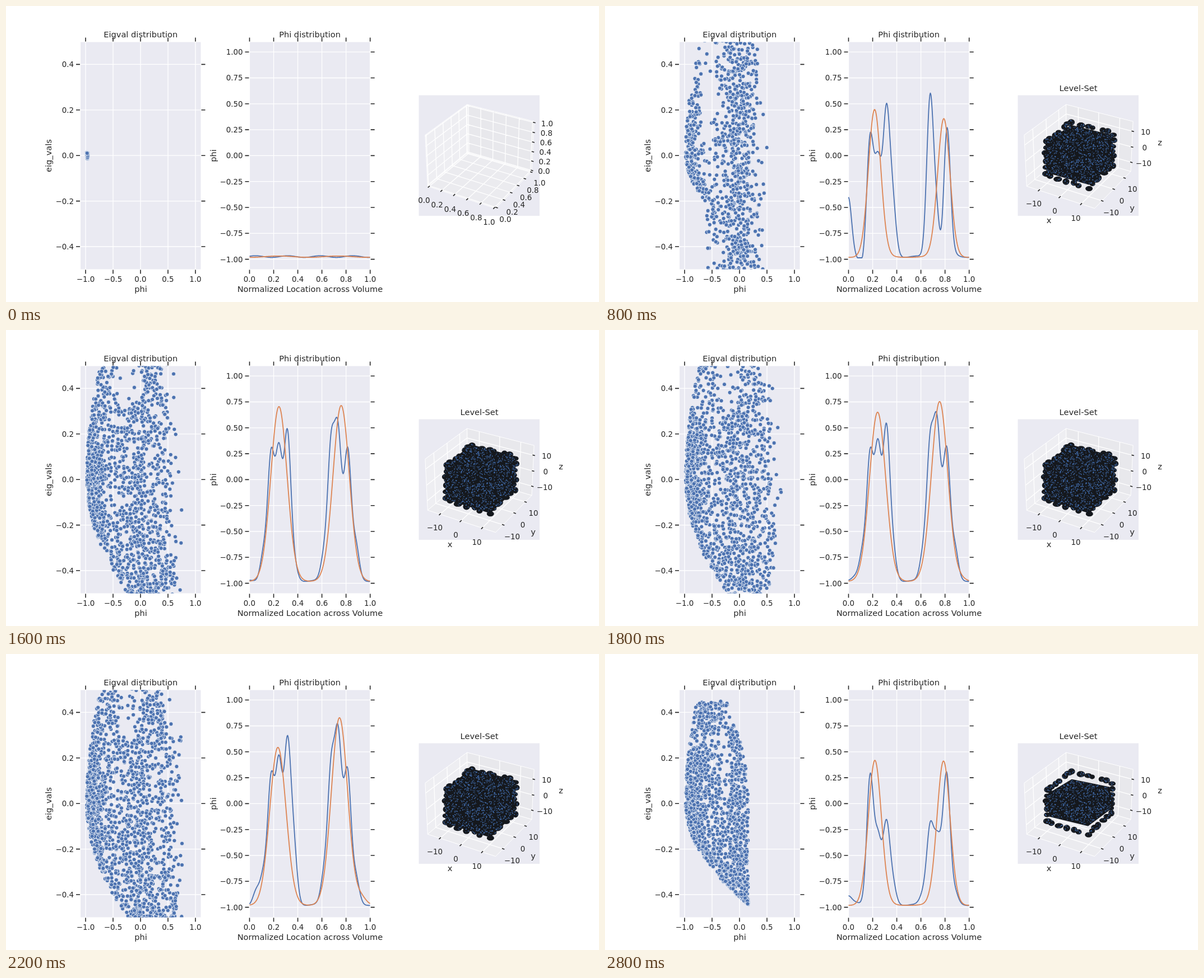
Recreate the animation shown at these times as an HTML page with a canvas. Size 1058 by 529 pixels, loop 3.2 s.

```html
<!DOCTYPE html>
<html lang="en">
<head>
<meta charset="utf-8">
<title>Level-set evolution</title>
<style>
  html, body { margin: 0; width: 100%; height: 100%; overflow: hidden; background: #fff; }
  svg, canvas { position: absolute; left: 0; top: 0; width: 1058px; height: 529px; }
  text { font-family: "DejaVu Sans", sans-serif; font-size: 13.4px; fill: #262626; text-anchor: middle; }
  .big { font-size: 14.6px; }
  .end { text-anchor: end; }
  .grid { stroke: #fff; stroke-width: 1.3; fill: none; }
  .tick { stroke: #262626; stroke-width: 1.6; fill: none; }
</style>
</head>
<body>
<svg id="axes" viewBox="0 0 1058 529"></svg>
<canvas id="plot" width="1058" height="529"></canvas>
<script>
const svg = document.getElementById('axes');
const ctx = document.getElementById('plot').getContext('2d');
const BLUE = '#4c72b0', ORANGE = '#dd8452', PANEL = '#eaeaf2';
const TOP = 64.5, BOTTOM = 470.5, TAU = 2 * Math.PI;

// ---------- axes ----------
function add(parent, tag, attrs, text) {
  const el = document.createElementNS('http://www.w3.org/2000/svg', tag);
  for (const k in attrs) el.setAttribute(k, attrs[k]);
  if (text !== undefined) el.textContent = text;
  return parent.appendChild(el);
}
const label = (g, x, y, text, cls = '') => add(g, 'text', { x, y, class: cls }, text);
const path = (g, d, cls) => add(g, 'path', { d, class: cls });
const num = (v, digits) => v.toFixed(digits).replace('-', '\u2212');

function axes2d(o) {
  add(svg, 'rect', { x: o.left, y: TOP, width: o.right - o.left, height: BOTTOM - TOP, fill: PANEL });
  let grid = '', ticks = '';
  for (let i = 0; i < o.xn; i++) {
    const x = o.x0 + i * o.dx;
    grid += `M${x} ${TOP}V${BOTTOM}`;
    ticks += `M${x} ${TOP - 1}v-7M${x} ${BOTTOM + 1}v7`;
    label(svg, x, 493, num(o.xv + i * o.xs, 1));
  }
  for (let i = 0; i < o.yn; i++) {
    const y = o.y0 + i * o.dy, v = o.yv - i * o.ys;
    grid += `M${o.left} ${y}H${o.right}`;
    ticks += `M${o.left - 1} ${y}h-7M${o.right + 1} ${y}h7`;
    label(svg, o.left - 12, y + 4.9, num(Math.abs(v) < 1e-6 ? 0 : v, o.digits), 'end');
  }
  path(svg, grid, 'grid');
  path(svg, ticks, 'tick');
  const mid = (o.left + o.right) / 2;
  label(svg, mid, 56, o.title, 'big');
  label(svg, mid + 0.3, 511, o.xlabel, 'big');
  add(svg, 'text', { transform: `translate(${o.lx} 267.5) rotate(-90)`, class: 'big' }, o.ylabel);
}
axes2d({ left: 133, right: 347.5, x0: 142, dx: 49, xn: 5, xv: -1, xs: 0.5,
  y0: 104.4, dy: 81.4, yn: 5, yv: 0.4, ys: 0.2, digits: 1,
  title: 'Eigval distribution', xlabel: 'phi', ylabel: 'eig_vals', lx: 80.5 });
axes2d({ left: 434.5, right: 649.7, x0: 434.5, dx: 43.04, xn: 6, xv: 0, xs: 0.2,
  y0: 82.2, dy: 46.3, yn: 9, yv: 1, ys: 0.25, digits: 2,
  title: 'Phi distribution', xlabel: 'Normalized Location across Volume', ylabel: 'phi', lx: 374.5 });

// Perspective view of the unit box: elevation 30, azimuth -60.
function project(x, y, z) {
  x = (x - 0.5) * 1.19; y = (y - 0.5) * 1.19; z = (z - 0.5) * 0.893;
  const k = 1167.6 / (10 - 0.433 * x + 0.75 * y - 0.5 * z);
  return [846.9 + k * (0.866 * x + 0.5 * y), 264.4 - k * (-0.25 * x + 0.433 * y + 0.866 * z)];
}
const poly = (...pts) => 'M' + pts.map(p => project(...p).map(v => v.toFixed(1)).join(' ')).join('L');

add(svg, 'rect', { x: 736.5, y: 159.5, width: 215.5, height: 215.5, fill: PANEL });
[['#eeeef2', [0, 0, 0], [0, 0, 1], [0, 1, 1], [0, 1, 0]],
 ['#e8e8ec', [0, 1, 0], [0, 1, 1], [1, 1, 1], [1, 1, 0]],
 ['#ebebef', [0, 0, 0], [0, 1, 0], [1, 1, 0], [1, 0, 0]]].forEach(([fill, ...pts]) =>
  add(svg, 'path', { d: poly(...pts) + 'Z', fill, stroke: '#fff', 'stroke-width': 1 }));

function axes3d(stops, names, ends) {
  const g = add(svg, 'g', {});
  let grid = '', ticks = '';
  for (const t of stops) {
    grid += poly([t, 0, 0], [t, 1, 0], [t, 1, 1]) + poly([1, t, 0], [0, t, 0], [0, t, 1])
          + poly([0, 0, t], [0, 1, t], [1, 1, t]);
    ticks += poly([t, -0.025, 0], [t, 0.02, 0]) + poly([0.985, t, 0], [1.02, t, 0])
           + poly([0.985, 1, t], [1.02, 1, t]);
  }
  path(g, grid, 'grid');
  path(g, ticks, 'tick');
  for (const [x0, y0, x1, y1] of ends)
    names.forEach((s, i) => {
      const t = i / (names.length - 1);
      label(g, lerp(x0, x1, t), lerp(y0, y1, t) + 4.9, s);
    });
  return g;
}
const lerp = (a, b, t) => a + (b - a) * t;
const unit = [0, 0.2, 0.4, 0.6, 0.8, 1];
const emptyAxes = axes3d(unit.map(t => 0.02 + 0.96 * t), unit.map(t => num(t, 1)),
  [[746, 347, 862, 386], [891, 381, 952, 316], [960, 295.5, 965.5, 210]]);
const levelAxes = axes3d([0.19, 0.5, 0.81], ['\u221210', '0', '10'],
  [[765, 353.5, 840, 379], [903, 369, 941, 327], [961, 281, 964.5, 225.5]]);
label(levelAxes, 844.5, 152, 'Level-Set', 'big');
label(levelAxes, 792, 388, 'x', 'big');
label(levelAxes, 940.5, 366, 'y', 'big');
label(levelAxes, 990, 249, 'z', 'big');

// ---------- key poses, blended linearly ----------
// blue: height over the base line at each of CENTERS.
// orange: height and centre of two bumps, their width, tail on the right.
// dots: count, reach in y, right edge, its lean, tail, bend of the lower left edge, its cap, column share.
// gap: ellipse with few dots. size: growth of the surface.
const CENTERS = [434, 447, 460, 473, 487, 502, 513, 568, 580, 592, 601, 610, 624];
const POSES = [
  { step: 0, size: 0, blue: CENTERS.map(() => 0), orange: [0, 481, 0, 604, 11, 0],
    dots: [26, 0.014, -0.955, 0, 0, 9, -0.6, 0], gap: [-0.62, 0.3, 0, 0] },
  { step: 4, size: 0.6, blue: [106, 6, 4, 222, 188, 272, 140, 36, 292, 110, 64, 229, 18],
    orange: [262, 481, 246, 604.5, 11, 0],
    dots: [1010, 0.51, 0.36, 0.3, 0.28, 9, -0.6, 0.5], gap: [-0.6, 0.32, 0.1, 0.32] },
  { step: 6, size: 0.9, blue: [0, 2, 10, 224, 210, 281, 125, 40, 280, 241, 143, 230, 26],
    orange: [297, 485, 260, 602.5, 14, 0],
    dots: [1300, 0.51, 0.46, 0.4, 0.28, 3.6, 0.5, 0.25], gap: [-0.5, 0.02, 0.14, 0.07] },
  { step: 8, size: 1, blue: [0, 2, 70, 238, 247, 270, 80, 75, 266, 288, 192, 237, 76],
    orange: [310, 487, 312, 598, 14.5, 0],
    dots: [1500, 0.51, 0.56, 0.8, 0.25, 3, 0.5, 0.1], gap: [-0.24, 0.43, 0.26, 0.12] },
  { step: 12, size: 1.1, blue: [0, 38, 78, 238, 275, 311, 177, 85, 270, 336, 243, 242, 56],
    orange: [270, 484.5, 340, 594, 14.5, 17],
    dots: [1780, 0.51, 0.68, 1.4, 0.25, 3, 0.5, 0.1], gap: [-0.14, 0.42, 0.2, 0.15] },
  { step: 14, size: 0, blue: [15, 4, 22, 236, 135, 151, 63, 36, 148, 134, 152, 235, 36],
    orange: [257, 481.5, 256, 604, 11.7, 0],
    dots: [1480, 0.45, 0.16, 2, 0, 5.8, 0.5, 0.25], gap: [-0.25, 0.22, 0.11, 0.22] }
];
function poseAt(step) {
  const j = Math.max(1, POSES.findIndex(p => p.step >= step));
  const a = POSES[j - 1], b = POSES[j], t = (step - a.step) / (b.step - a.step);
  const pose = {};
  for (const k in a)
    pose[k] = Array.isArray(a[k]) ? a[k].map((v, i) => lerp(v, b[k][i], t)) : lerp(a[k], b[k], t);
  return pose;
}
function random(seed) {
  let s = seed * 7919 + 17;
  return () => {
    s = (s + 0x6d2b79f5) | 0;
    let t = Math.imul(s ^ (s >>> 15), 1 | s);
    t = (t + Math.imul(t ^ (t >>> 7), 61 | t)) ^ t;
    return ((t ^ (t >>> 14)) >>> 0) / 4294967296;
  };
}

// ---------- drawing ----------
function drawDots([count, reach, right, lean, tail, bend, cap, column], [gapX, gapY, gapW, gapH], seed) {
  const rnd = random(seed);
  const gauss = () => Math.sqrt(-2 * Math.log(1 - rnd())) * Math.cos(TAU * rnd());
  const edge = 0.24;
  ctx.save();
  ctx.beginPath();
  ctx.rect(133, TOP, 214.5, BOTTOM - TOP);
  ctx.clip();
  ctx.fillStyle = BLUE;
  ctx.strokeStyle = '#fff';
  ctx.lineWidth = 0.75;
  for (let shown = 0, tries = 0; shown < count && tries < 30000; tries++) {
    const pick = rnd();
    const y = pick < edge ? gauss() * 0.16 : reach * (2 * rnd() - 1);
    const l = Math.min(cap, -0.98 + (y < 0 ? bend : 1) * y * y);
    const r = right - (y > 0 ? lean * y * y : 0) + tail * rnd() ** 5;
    const x = pick < edge ? l + Math.abs(gauss()) * 0.14
      : pick < edge + column ? -0.03 + gauss() * 0.16 : lerp(l, r, rnd());
    const inGap = Math.hypot((x - gapX) / (gapW + 1e-6), (y - gapY) / (gapH + 1e-6)) < 1;
    if (Math.abs(y) > reach || x < l || x > r || (inGap && rnd() < 0.85)) continue;
    shown++;
    ctx.beginPath();
    ctx.arc(240 + 98 * x, 267.2 - 407 * y, 3.6, 0, TAU);
    ctx.fill();
    ctx.stroke();
  }
  ctx.restore();
}

const bell = (d, w) => Math.exp(-d * d / (2 * w * w));
function drawCurve(color, f) {
  ctx.beginPath();
  for (let x = 434.5; x <= 650; x++) ctx.lineTo(x, f(x));
  ctx.strokeStyle = color;
  ctx.lineWidth = 1.8;
  ctx.lineJoin = 'round';
  ctx.stroke();
}
// Sum of equal bells; their weights are solved so that the sum meets the given heights.
function drawBlue(heights) {
  const weights = heights.slice();
  const sum = x => weights.reduce((s, h, i) => s + h * bell(x - CENTERS[i], 6), 0);
  for (let pass = 0; pass < 40; pass++)
    CENTERS.forEach((c, i) => { weights[i] += heights[i] - sum(c); });
  drawCurve(BLUE, x => Math.min(450, 447.8 - 1.5 * Math.cos((x - 445) / 9.2) - sum(x)));
}
function drawOrange([h1, c1, h2, c2, w, tail]) {
  drawCurve(ORANGE, x => 448 + 1.2 * Math.cos((x - 540) / 16.7)
    - h1 * bell(x - c1, w) - h2 * bell(x - c2, w) - tail * bell(x - 634, 9));
}

// Box-shaped surface: a solid core plus lumps along its silhouette that merge as it grows.
const CORNERS = [[0, 0, 0], [0, 0, 1], [0, 1, 1], [1, 1, 1], [1, 1, 0], [1, 0, 0]];
function drawSurface(size) {
  const rnd = random(5), shape = new Path2D();
  const full = Math.min(1, size), s = 0.63 + 0.02 * size;
  const outline = CORNERS.map(p => project(...p.map(v => 0.5 + (v - 0.5) * s)));
  const shrink = ([x, y]) => [847 + (x - 847) * lerp(0.9, 1, full), 264.4 + (y - 264.4) * lerp(0.7, 1, full)];
  outline.forEach((p, i) => shape[i ? 'lineTo' : 'moveTo'](...shrink(p)));
  shape.closePath();
  const perEdge = 6;
  outline.forEach((p, i) => {
    const q = outline[(i + 1) % outline.length];
    for (let k = 0; k < perEdge; k++) {
      const t = (k + 0.5 * rnd()) / perEdge, out = 0.95 + 0.07 * rnd() * (0.5 + size);
      const x = 847 + (lerp(p[0], q[0], t) - 847) * out, y = 264.4 + (lerp(p[1], q[1], t) - 264.4) * out;
      const w = 3.5 + 3.5 * rnd(), h = 3 + 2 * rnd();
      shape.moveTo(x + w, y);
      shape.ellipse(x, y, w, h, 0, 0, TAU);
    }
  });
  ctx.fillStyle = ctx.strokeStyle = '#15181d';
  ctx.lineWidth = 2;
  ctx.lineJoin = 'round';
  ctx.fill(shape);
  ctx.stroke(shape);
  ctx.save();
  ctx.clip(shape);
  ctx.fillStyle = '#4573b8';
  for (let i = 0; i < 1700; i++) {
    const x = 778 + 140 * rnd(), y = 204 + 120 * rnd(), a = TAU * rnd(), r = 0.7 + 0.8 * rnd();
    ctx.beginPath();
    for (let k = 0; k < 3; k++) ctx.lineTo(x + r * Math.cos(a + k * 2.1), y + r * Math.sin(a + k * 2.1));
    ctx.fill();
  }
  ctx.restore();
}

let current = -1;
function frame(now) {
  const step = Math.min(14, Math.floor((now % 3200) / 200));
  if (step !== current) {
    current = step;
    const pose = poseAt(step), solid = step >= 3;
    ctx.clearRect(0, 0, 1058, 529);
    drawDots(pose.dots, pose.gap, step + 1);
    drawBlue(pose.blue);
    drawOrange(pose.orange);
    emptyAxes.style.display = solid ? 'none' : '';
    levelAxes.style.display = solid ? '' : 'none';
    if (solid) drawSurface(pose.size);
  }
  requestAnimationFrame(frame);
}
requestAnimationFrame(frame);
</script>
</body>
</html>
```
